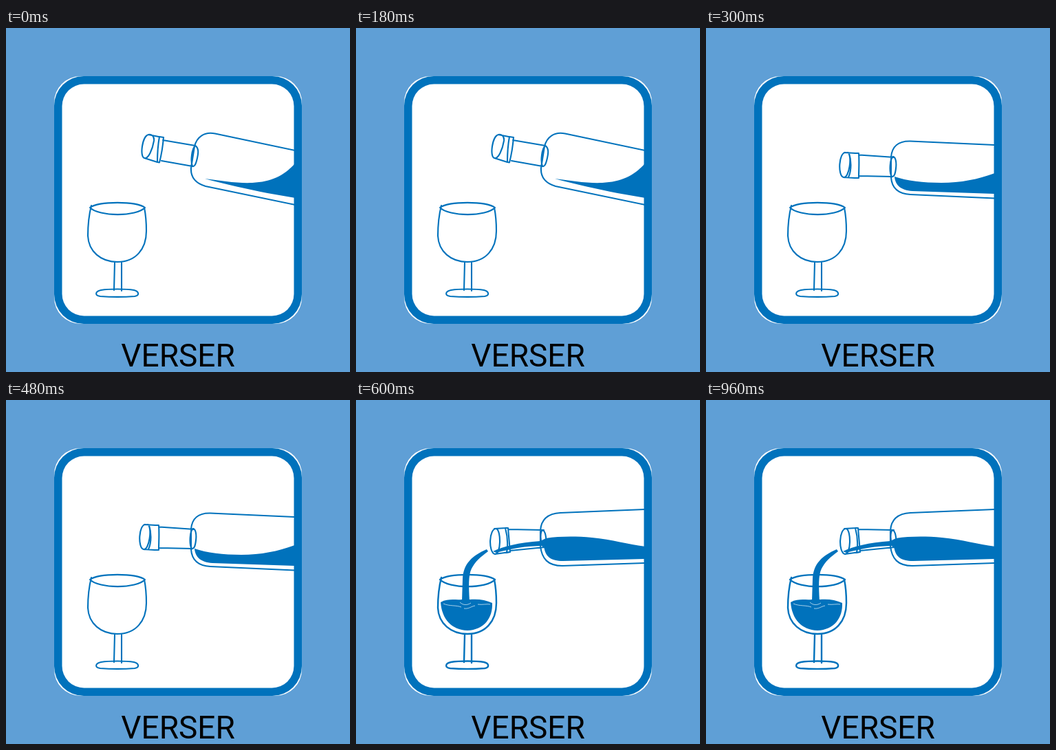
An HTML page for the animation above (1200 ms loop, 500x500 px).

```html
<!DOCTYPE html>
<html lang="fr">
<head>
<meta charset="utf-8">
<title>Verser</title>
<style>
html, body { margin: 0; width: 100%; height: 100%; overflow: hidden; background: #5f9fd6; }
svg { display: block; width: 100vw; height: 100vh; }
text { font: 46px Roboto, sans-serif; text-anchor: middle; }
.line { fill: none; stroke: #0072bc; stroke-width: 2.1; stroke-linecap: round; stroke-linejoin: round; }
.fill { fill: #0072bc; }
</style>
</head>
<body>
<svg viewBox="0 0 500 500">
  <defs><clipPath id="card"><rect x="80" y="80" width="339" height="340"/></clipPath></defs>
  <rect width="500" height="500" fill="#5f9fd6"/>
  <rect x="70" y="70" width="360" height="360" rx="38" fill="#fff"/>
  <rect class="fill" x="70" y="70" width="360" height="360" rx="43"/>
  <rect x="81.5" y="81.5" width="337" height="337" rx="32" fill="#fff"/>
  <g clip-path="url(#card)">
    <path id="wine" class="fill"/>
    <path id="bottle" class="line"/>
    <g id="glass" class="line">
      <path d="M122 261C136 251.5 188 251.5 202 261C190 274.5 135 274.5 122 261Z"/>
      <path d="M124 258C120 274 119 288 119 302C120 325 138 340 162 340C188 340 204 322 204 295C204 282 203 271 201 261"/>
      <path d="M158 341L157 381M168 341V382"/>
      <path d="M138 381C150 379 174 379 186 381C194 383 194 389 187 390C173 391 151 391 137 390C129 389 129 383 138 381Z"/>
    </g>
    <g id="pour">
      <path class="fill" d="M190 217C169 226 156 238 155 260L154 292H165C164 272 163 255 168 245C173 235 181 228 192 220Z"/>
      <path class="fill" d="M123 294C134 288 144 291 154 290L165 290C177 289 188 290 198 295C199 317 186 334 162 335C139 334 125 319 123 294Z"/>
      <path d="M127 296C136 300 146 298 153 301M157 303C164 304 167 300 173 299M177 297C184 298 190 296 195 297M151 294C155 298 161 299 167 295" fill="none" stroke="#fff" stroke-width="1" opacity=".65"/>
    </g>
  </g>
  <text x="250" y="492">VERSER</text>
</svg>
<script>
const LOOP = 1200;
const poses = [
  {
    from: 0, stroke: 2.1, pour: false,
    bottle: "M420 178L304 153.5C288 150 277 159 274 172L269 203C268 218 276 226 290 230L420 257" +
      "M228 163L275 171M226 193L271 201M275 171C280 174 280 181 278 189C276 198 274 202 271 201C268 194 270 175 275 171Z" +
      "M207 155L222 158M201 189L220 195M207 155C198 157 194 187 201 189C207 191 213 176 215 164C216 157 211 154 207 155" +
      "M223 158L229 159C228 171 226 184 223 195.5L220 195C220 181 221 169 223 158Z",
    wine: "M289 219C312 222 336 226 358 225C386 224 405 214 420 197V247L380 240C350 234 318 227 289 219Z"
  },
  {
    from: 300, stroke: 2.1, pour: false,
    bottle: "M420 170L297 164.5C280 164 270 172 269 188L269 217C270 233 279 241 297 242L420 247.5" +
      "M223 184.5L274 188M223 215L270 216M272 187C276 188 277 196 276 204C275 213 273 217 270 216C266 210 267 190 272 187Z" +
      "M201 181L217 182M200 217L216 218M203 181C193 180 191 215 200 217C208 219 213 185 206 181" +
      "M217 182H222C223 194 222 207 222 218H216M208 182C211 192 212 206 207 217",
    wine: "M274 216C291 222 316 225 342 225C371 225 396 220 420 211V241L300 237C283 236 275 228 274 216Z"
  },
  {
    from: 600, stroke: 2.4, pour: true,
    bottle: "M420 159L297 164C279 165 269 173 268 190L268 212C270 231 279 241 300 241L420 237" +
      "M222 188L273 189M224 219L274 214M271 189C275 190 277 200 276 207C275 213 274 215 272 213C268 207 267 193 271 189Z" +
      "M201 187L219 186M202 224L223 221M204 187C193 186 192 222 202 224C211 224 211 190 204 187" +
      "M217 186L221 186C222 198 223 210 224 221L219 222C221 211 220 197 217 186",
    wine: "M199 220C213 213 237 207 268 205L276 201C296 198 319 198 343 200C373 203 397 210 420 213V231L301 234C283 234 275 228 273 212C246 212 226 216 204 222Z"
  }
];
const $ = id => document.getElementById(id);
let shown;

function render(time) {
  const t = time % LOOP;
  const pose = poses.findLast(p => t >= p.from);
  if (pose !== shown) {
    shown = pose;
    $("bottle").setAttribute("d", pose.bottle);
    $("wine").setAttribute("d", pose.wine);
    $("glass").style.strokeWidth = pose.stroke;
    $("pour").style.display = pose.pour ? "" : "none";
  }
}

const start = performance.now();
function tick() {
  render(performance.now() - start);
  requestAnimationFrame(tick);
}
tick();
</script>
</body>
</html>
```
